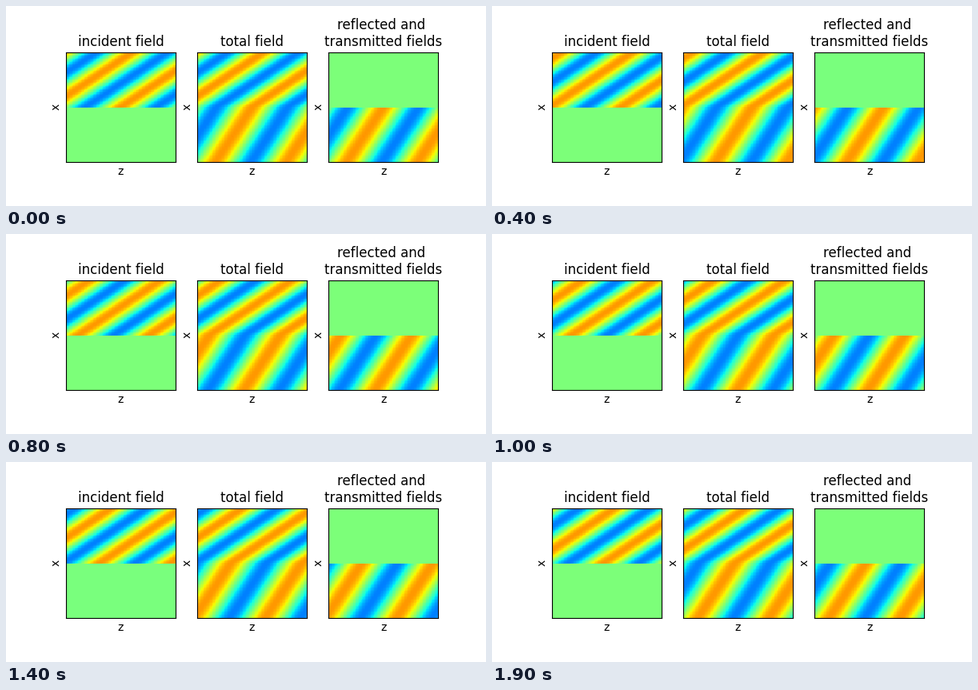
Write a matplotlib script that moves like this. It is 600 px wide and 250 px high and loops after 2000 ms.

```python
import numpy as np
import matplotlib.pyplot as plt
from matplotlib.animation import FuncAnimation

plt.rcParams["font.family"] = "DejaVu Sans"

FRAMES = 20
N = 101          # samples per side
KZ = 4.8         # wave number along the interface
INDEX = 1.5      # ratio of refractive indices; incidence at Brewster's angle

z, x = np.meshgrid(np.linspace(-1, 1, N), np.linspace(-1, 1, N))
above = x <= 0
phase = KZ * (z + np.where(above, x * INDEX, x / INDEX))


def fields(i):
    total = np.cos(phase - 2 * np.pi * i / FRAMES)
    return np.where(above, total, 0), total, np.where(above, 0, total)


fig, axes = plt.subplots(1, 3, figsize=(6, 2.5), dpi=100, facecolor="white")
fig.subplots_adjust(left=0.125, right=0.9, bottom=0.11, top=0.88, wspace=0.2)

titles = ("incident field", "total field",
          "reflected and \ntransmitted fields")
images = []
for ax, title, data in zip(axes, titles, fields(0)):
    images.append(ax.imshow(data, cmap="jet", vmin=-2, vmax=2,
                            interpolation="nearest"))
    ax.set_title(title, fontsize=12)
    ax.set_xlabel("z", fontsize=10)
    ax.set_ylabel("x", fontsize=10)
    ax.set_xticks([])
    ax.set_yticks([])


def update(i):
    for image, data in zip(images, fields(i)):
        image.set_data(data)
    return images


anim = FuncAnimation(fig, update, frames=FRAMES, interval=100,
                     repeat=True, repeat_delay=0, blit=False)
plt.show()
```
